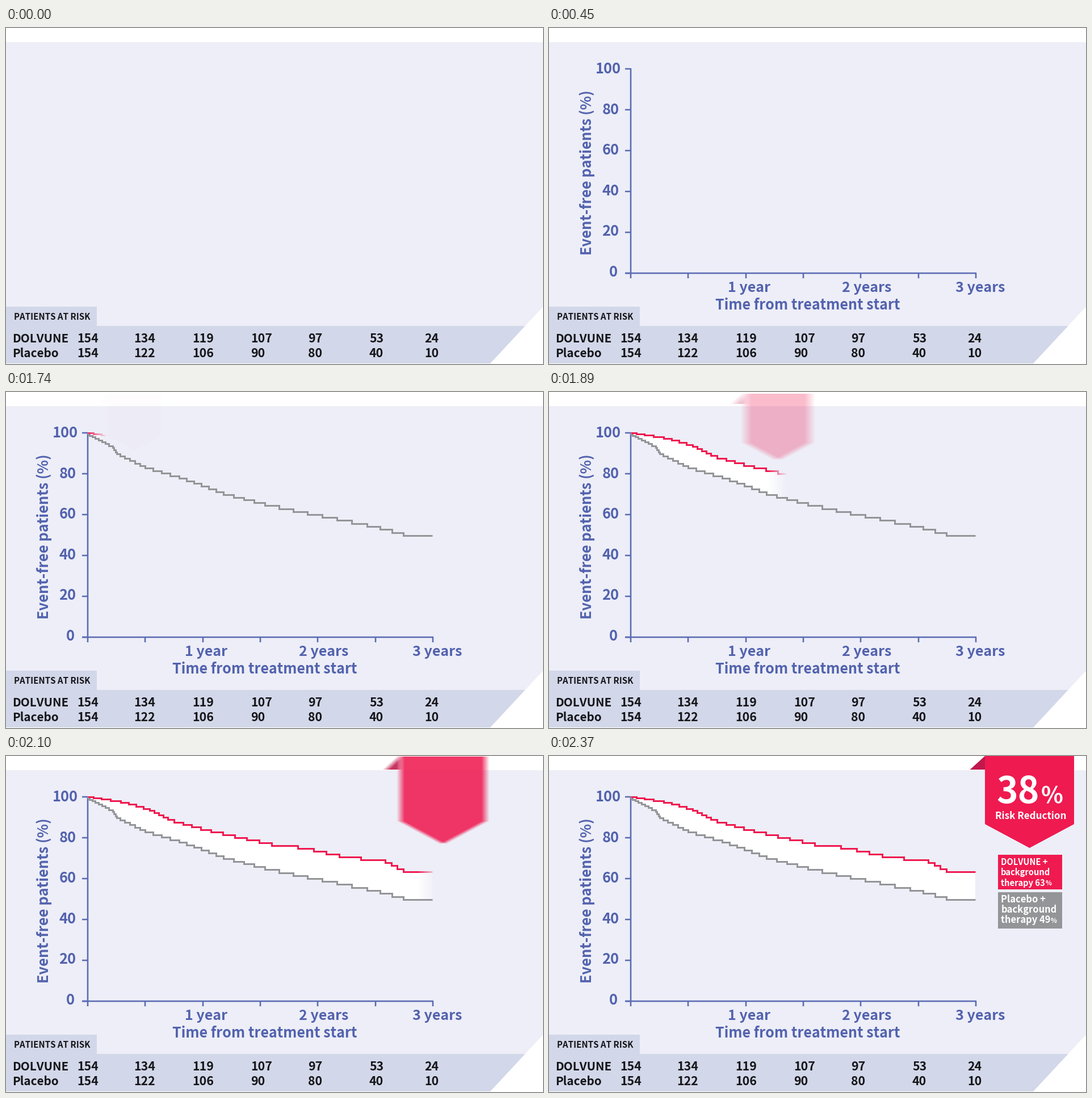
Animation, 946 px wide and 592 px high, one loop 4.41 s. Source, as a matplotlib script:

```python
import matplotlib.pyplot as plt
import numpy as np
from matplotlib.animation import FuncAnimation
from matplotlib.colors import to_rgb

W, H, DPI = 946, 592, 64
PT = 72 / DPI
STEP, FRAMES = 30, 147

PAPER, BAND = "#edeef7", "#d2d7e9"
BLUE, LABEL, INK = "#5a6bb3", "#5262ae", "#151518"
RED, FOLD, GREY = "#ef1a50", "#c0184c", "#939598"
DRUG = "DOLVUNE"

# Steps at which each part starts
AXES_IN, LOW_IN, TOP_IN, CAPTIONS_IN = 1, 23, 58, 75

plt.rcParams["font.family"] = ["Noto Sans CJK JP", "DejaVu Sans"]
fig = plt.figure(figsize=(W / DPI, H / DPI), dpi=DPI, facecolor="white")
ax = fig.add_axes([0, 0, 1, 1])
ax.axis("off")


def poly(points, color, z):
    return ax.add_patch(plt.Polygon(points, fc=color, ec="none", lw=0, zorder=z))


def rect(x0, y0, x1, y1, color, z):
    return poly([(x0, y0), (x1, y0), (x1, y1), (x0, y1)], color, z)


def line(xs, ys, color, width, z, **kw):
    return ax.plot(xs, ys, color=color, lw=width * PT, zorder=z,
                   solid_capstyle="butt", solid_joinstyle="miter", **kw)[0]


def text(x, y, s, size, color, z, ha="left", **kw):
    return ax.text(x, y, s, fontsize=size * PT, color=color, zorder=z,
                   weight="bold", ha=ha, va="baseline", **kw)


def picture(x0, y0, x1, y1, z):
    return ax.imshow(np.zeros((1, 1, 4)), extent=(x0, x1, y1, y0), zorder=z,
                     aspect="auto", interpolation="nearest", vmin=0, vmax=1)


class Wipe:
    """Paper-coloured cover that clears from left to right with a soft edge."""

    def __init__(self, x0, y0, x1, y1, z, soft=34):
        self.x = np.arange(x0, x1) + 0.5
        self.soft = soft
        self.rgba = np.empty((1, x1 - x0, 4))
        self.rgba[..., :3] = to_rgb(PAPER)
        self.img = picture(x0, y0, x1, y1, z)

    def set(self, edge):
        self.rgba[0, :, 3] = np.clip((self.x - edge) / self.soft + 0.5, 0, 1)
        self.img.set_data(self.rgba.copy())
        self.img.set_visible(edge < self.x[-1] + self.soft / 2)


def build_stage():
    poly([(0, 25), (W, 25), (W, 491), (853, 591), (0, 591)], PAPER, 0)
    rect(0, 490.5, 159.5, 525, BAND, 9)
    poly([(0, 525), (914.4, 525), (853, 591), (0, 591)], BAND, 9)
    text(14.5, 514, "PATIENTS AT RISK", 15, INK, 10)
    columns = (125, 225, 328, 431, 532, 640, 737)
    for y, name, counts in ((554, DRUG, "154 134 119 107 97 53 24"),
                            (580.5, "Placebo", "154 122 106 90 80 40 10")):
        text(11.5, y, name, 20.7, INK, 10)
        for x, count in zip(columns, counts.split()):
            text(x, y, count, 21.3, INK, 10)


def build_axes():
    def stroke(x0, y0, x1, y1):
        line([x0, x1], [y0, y1], BLUE, 4, 2, alpha=0.2)
        line([x0, x1], [y0, y1], BLUE, 2.2, 2)

    left, right, top, base = 144, 752, 71.7, 431.5
    stroke(left, top - 1, left, base + 9)
    stroke(left - 10, base, right + 1, base)
    for i, y in enumerate(np.linspace(top, base, 6)):
        stroke(left - 10, y, left, y)
        s = str(100 - 20 * i)
        text(117.5 + 3 * len(s), 80 + 71.6 * i, s, 25.4, LABEL, 2, ha="right")
    for x in np.linspace(left, right, 7)[1:]:
        stroke(x, base, x, base + 9)
    for i, s in enumerate(("1 year", "2 years", "3 years")):
        text(315 + 200.5 * i, 465, s, 25, LABEL, 2)
    text(293, 496.5, "Time from treatment start", 25.1, LABEL, 2)
    text(75, 399.5, "Event-free patients (%)", 25.4, LABEL, 2,
         rotation=90, rotation_mode="anchor")


def stairs(trend, drops):
    """Survival steps along a trend, with drops that grow towards the end."""
    tx, ty = np.array(trend).T
    y = ty[0] + (ty[-1] - ty[0]) * np.linspace(0, 1, drops) ** 1.25
    x = np.interp(y, ty, tx)
    return np.append(x, 751), np.append(y, y[-1])


def build_curves():
    low = stairs([(144, 75), (188, 98), (196, 111), (247, 135), (311, 154),
                  (384, 181), (454, 200), (571, 224), (647, 239), (700, 253)], 42)
    top = stairs([(144, 72), (206, 83), (248, 94), (291, 115), (351, 132),
                  (468, 158), (525, 164), (605, 182), (662, 185), (700, 204)], 32)
    xs = np.arange(144, 752)

    def level(curve):
        return curve[1][np.searchsorted(curve[0], xs, side="right") - 1]

    gap = ax.fill_between(xs, level(top), level(low), step="post",
                          fc="white", ec="none", lw=0, zorder=3)
    return (gap, line(*top, RED, 3, 4, drawstyle="steps-post"),
            line(*low, GREY, 3, 6, drawstyle="steps-post"))


def caption(y0, y1, color, name, share, size):
    parts = [rect(791, y0, 904, y1, color, 13)]
    for i, s in enumerate((name + " +", "background", "therapy " + share)):
        parts.append(text(796.3, y0 + 17.5 + 18.5 * i, s, size, "white", 14))
    percent = text(796.3 + 5.3 * size, y0 + 54.5, "%", 11.3, "white", 14)
    return parts + [percent]


def build_captions():
    headline = [text(788.5, 83, "38", 64, "white", 14),
                text(867, 83, "%", 40.5, "white", 14),
                text(786, 111, "Risk Reduction", 17, "white", 14)]
    return (headline + caption(174, 234.5, RED, DRUG, "63", 14.7)
            + caption(240, 304, GREY, "Placebo", "49", 16.5))


def ribbon(p, speed):
    """RGBA ribbon at progress p, smeared sideways by its speed."""
    scale, top = 0.6 + 0.4 * p, 4.5 * (1 - p)
    cx, blur = 217 + 629.5 * p, max(1, 0.37 * speed)
    x = np.arange(W)[None, :] + 0.5
    v = ((np.arange(165) + 0.5 - top) / scale)[:, None]

    def smear(lo, hi):
        lo, hi = cx + lo * scale, cx + hi * scale
        span = np.minimum(x + blur / 2, hi) - np.maximum(x - blur / 2, lo)
        return np.clip(span / blur, 0, 1)

    half = 78.5 * np.clip((162 - v) / 42, 0, 1) * (v > 0)
    body = smear(-half, half)
    fold = smear(-78.5 - 27 * v / 24.5, -78.5) * ((v > 0) & (v < 24.5))
    fold = fold * (1 - body)
    total = body + fold
    mix = (body / np.maximum(total, 1e-6))[..., None]
    rgb = mix * np.array(to_rgb(RED)) + (1 - mix) * np.array(to_rgb(FOLD))
    return np.dstack([np.clip(rgb, 0, 1), np.clip(total * p, 0, 1)])


build_stage()
build_axes()
gap, top_curve, low_curve = build_curves()
axes_wipe = Wipe(50, 55, 810, 502, 8)
low_wipe = Wipe(146, 62, 760, 262, 7)
top_wipe = Wipe(146, 62, 760, 262, 5)
badge = picture(0, 0, W, 165, 12)
captions = build_captions()
ax.set_xlim(0, W)
ax.set_ylim(H, 0)


def draw(n):
    for wipe, begin, x, speed in ((axes_wipe, AXES_IN, 72, 53.5),
                                  (low_wipe, LOW_IN, 160, 48.5),
                                  (top_wipe, TOP_IN, 160, 48.5)):
        wipe.set(x + speed * (n - begin) if n >= begin else -100)
    low_curve.set_visible(n >= LOW_IN)
    for part in (gap, top_curve, badge):
        part.set_visible(n >= TOP_IN)

    if n >= TOP_IN:
        u = min(1, (n - TOP_IN + 1.3) / 17.2)
        p = (1 - np.cos(np.pi * u)) / 2
        badge.set_data(ribbon(p, 57.5 * np.sin(np.pi * u)))

    fade = min(1, max(0, (n - CAPTIONS_IN + 1) / 5))
    for part in captions:
        part.set_alpha(fade)
        part.set_visible(fade > 0)
    return []


anim = FuncAnimation(fig, draw, frames=FRAMES, init_func=lambda: draw(0),
                     interval=STEP, repeat=True, repeat_delay=0, blit=False)
plt.show()
```
